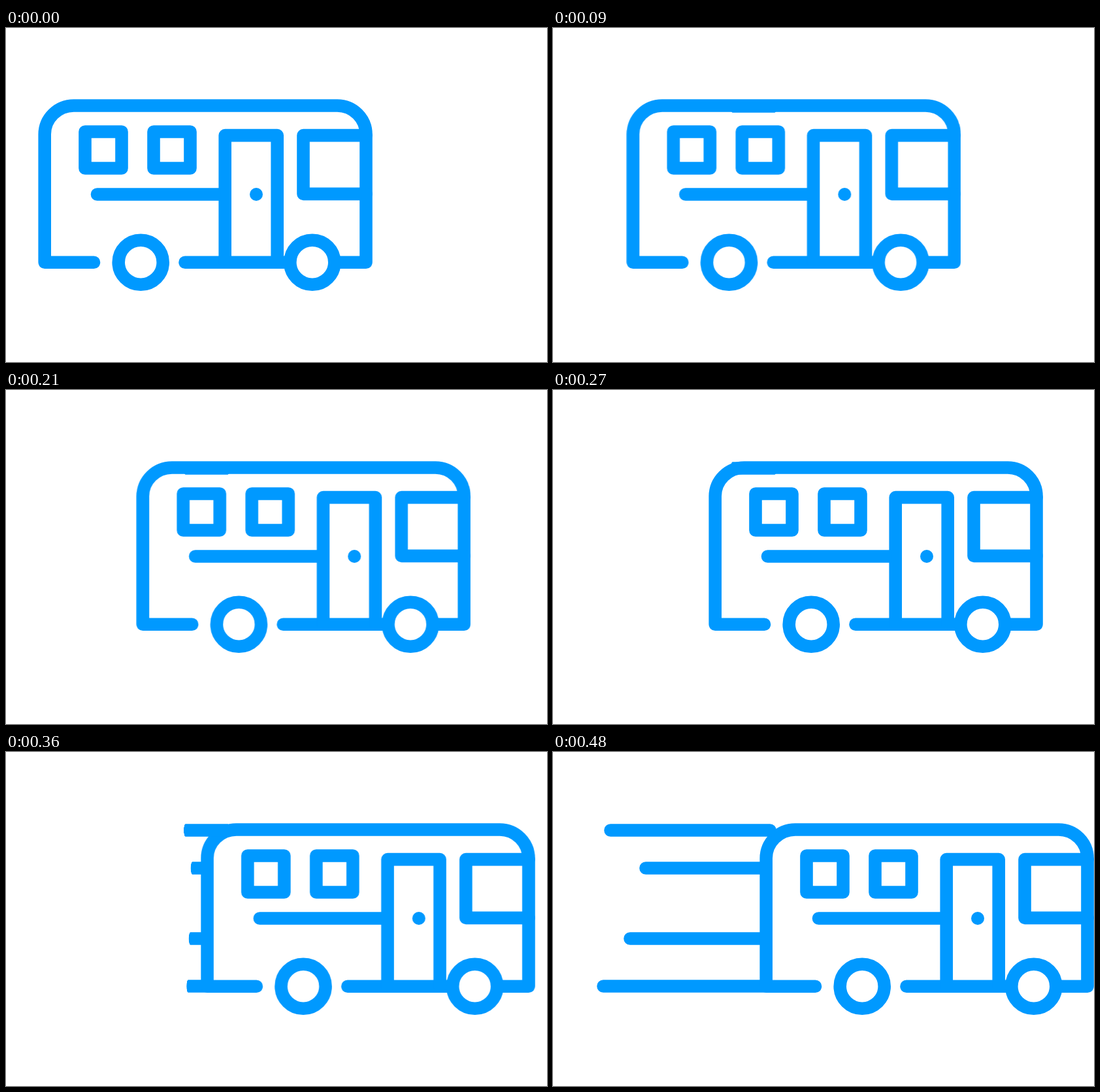
An HTML page that plays this animation: 828 px wide and 512 px high, repeating every 2380 ms.

```html
<!DOCTYPE html>
<html lang="en">
<head>
<meta charset="utf-8">
<title>Camper van</title>
<style>
  html, body { margin: 0; width: 100%; height: 100%; overflow: hidden; background: #fff; }
  svg { display: block; width: 828px; height: 512px; }
  .ink {
    fill: none;
    stroke: #09f;
    stroke-width: 19.6;
    stroke-linecap: round;
    stroke-linejoin: round;
  }
  .van { animation: drive 2380ms infinite; }
  .trail line {
    transform-origin: var(--right) 0;
    animation: grow 2380ms infinite;
  }

  /* Each segment advances in 30 ms steps. */
  @keyframes drive {
    0% { transform: translateX(0); animation-timing-function: steps(3); }
    3.781% { transform: translateX(63.3px); animation-timing-function: steps(2); }
    6.302% { transform: translateX(108px); animation-timing-function: steps(2); }
    8.823% { transform: translateX(150.2px); animation-timing-function: steps(2); }
    11.344% { transform: translateX(189px); animation-timing-function: steps(3); }
    15.126% { transform: translateX(248.8px); animation-timing-function: steps(1); }
    16.386%, 100% { transform: translateX(267px); }
  }
  @keyframes grow {
    0% { opacity: 0; transform: scaleX(var(--start)); animation-timing-function: step-end; }
    1.26% { opacity: 1; }
    15.126% { transform: scaleX(var(--start)); animation-timing-function: steps(4); }
    20.168%, 100% { opacity: 1; transform: scaleX(1); }
  }
</style>
</head>
<body>
<svg viewBox="0 0 828 512">
  <g class="ink trail">
    <line x1="142" y1="178" x2="323" y2="178" style="--right: 333px; --start: .25"/>
    <line x1="118" y1="286" x2="327" y2="286" style="--right: 337px; --start: .25"/>
    <line x1="77" y1="359" x2="336" y2="359" style="--right: 346px; --start: .25"/>
  </g>

  <g class="ink van">
    <rect x="59" y="163" width="492" height="206" fill="#fff" stroke="none"/>
    <!-- body -->
    <path d="M134.5 359.2H59.2V163A44.5 44 0 0 1 103.7 119H507A44 44 0 0 1 551 163V359.2H510M274 359.2H430"/>
    <!-- side windows -->
    <path d="M121 159h56v56h-56zM226 159h56v56h-56z"/>
    <!-- door, windscreen, stripe -->
    <path d="M335.2 359V164.6H415.2V359M551 164.6H455V254.4H551M139.5 255H335"/>
    <circle cx="383" cy="255" r="10" fill="#09f" stroke="none"/>
    <!-- wheels -->
    <circle cx="206.2" cy="359.2" r="34" fill="#fff"/>
    <circle cx="468.8" cy="359.2" r="34" fill="#fff"/>
  </g>

  <g class="ink trail">
    <line x1="88" y1="120" x2="332" y2="120" style="--right: 342px; --start: .265"/>
  </g>
</svg>
</body>
</html>
```
